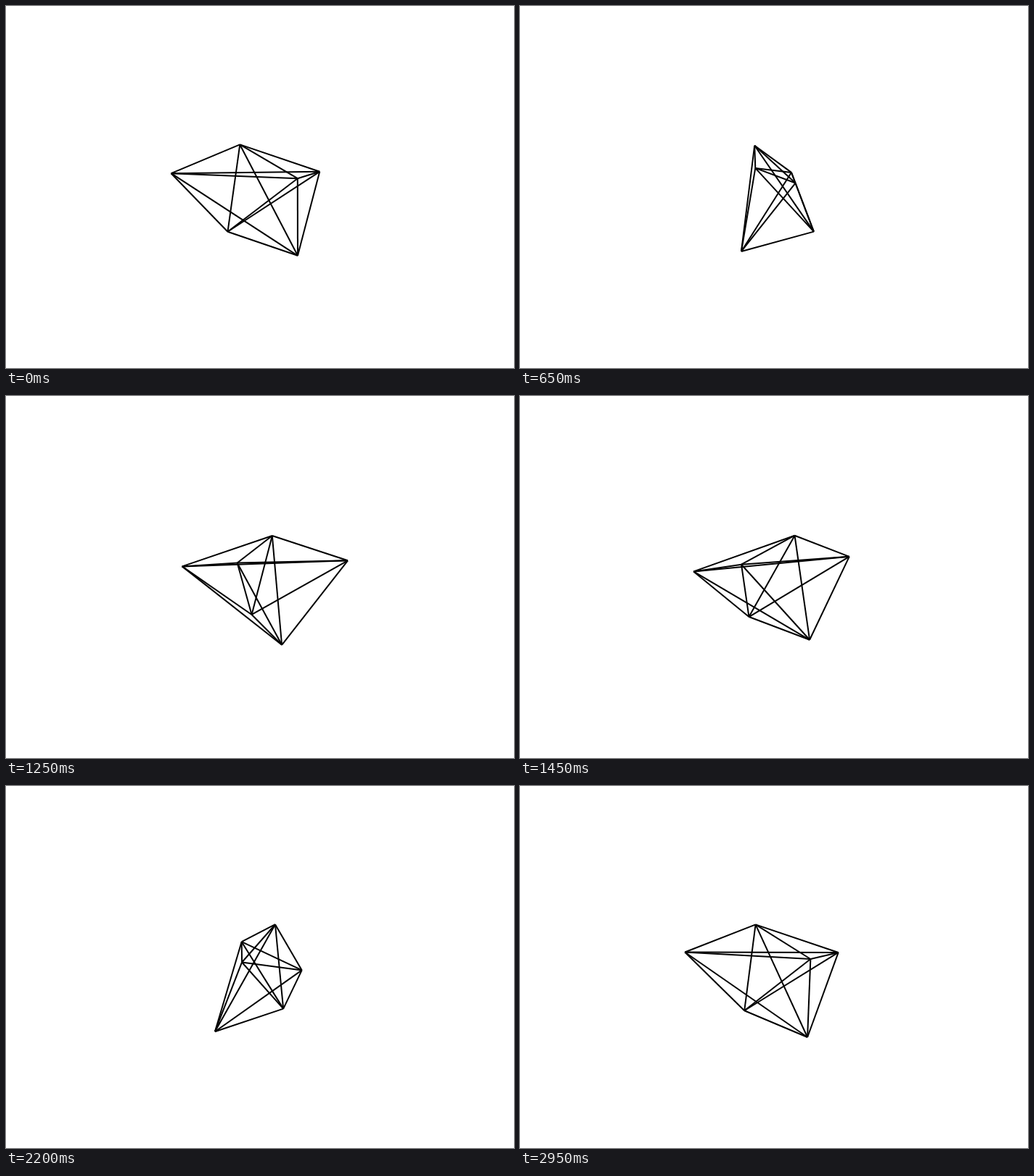
These frames come from a looping animation (700 by 500 pixels, 3000 ms). An HTML page with a canvas:

```html
<!DOCTYPE html>
<html lang="en">
<head>
<meta charset="utf-8">
<title>Rotating wireframe</title>
<style>
  html, body { margin: 0; width: 100%; height: 100%; overflow: hidden; background: #fff; }
  canvas { display: block; }
</style>
</head>
<body>
<canvas id="stage" width="700" height="500"></canvas>
<script>
const ctx = document.getElementById('stage').getContext('2d');
const LOOP = 3000, STEP = 50;
const AXIS_X = 350, HORIZON = 180, FOCAL = 388;

// Each vertex circles the vertical axis; drop is its depth below eye level.
const vertices = [
  { radius: 35, phase: 123.8, drop: 12 },
  { radius: 117.1, phase: 67.8, drop: 45.35 },
  { radius: 107.5, phase: 240.4, drop: 55.5 },
  { radius: 52.3, phase: 288.7, drop: 55.7 },
  { radius: 57.2, phase: 122.8, drop: 142.3 },
  { radius: 68.3, phase: 318.7, drop: 143 }
];

function project({ radius, phase, drop }, turn) {
  const angle = turn - phase * Math.PI / 180;
  const scale = FOCAL / (FOCAL - radius * Math.cos(angle));
  return [AXIS_X + radius * Math.sin(angle) * scale, HORIZON + drop * scale];
}

function draw(time) {
  const tick = Math.floor((time % LOOP) / STEP);
  const turn = tick * STEP / LOOP * 2 * Math.PI;
  const points = vertices.map(v => project(v, turn));

  ctx.fillStyle = '#fff';
  ctx.fillRect(0, 0, 700, 500);
  ctx.strokeStyle = '#000';
  ctx.lineWidth = 2;

  // Every pair of vertices is joined.
  points.forEach((a, i) => {
    for (const b of points.slice(i + 1)) {
      ctx.beginPath();
      ctx.moveTo(...a);
      ctx.lineTo(...b);
      ctx.stroke();
    }
  });
}

const start = performance.now();
function loop() {
  draw(performance.now() - start);
  requestAnimationFrame(loop);
}
loop();
</script>
</body>
</html>
```
